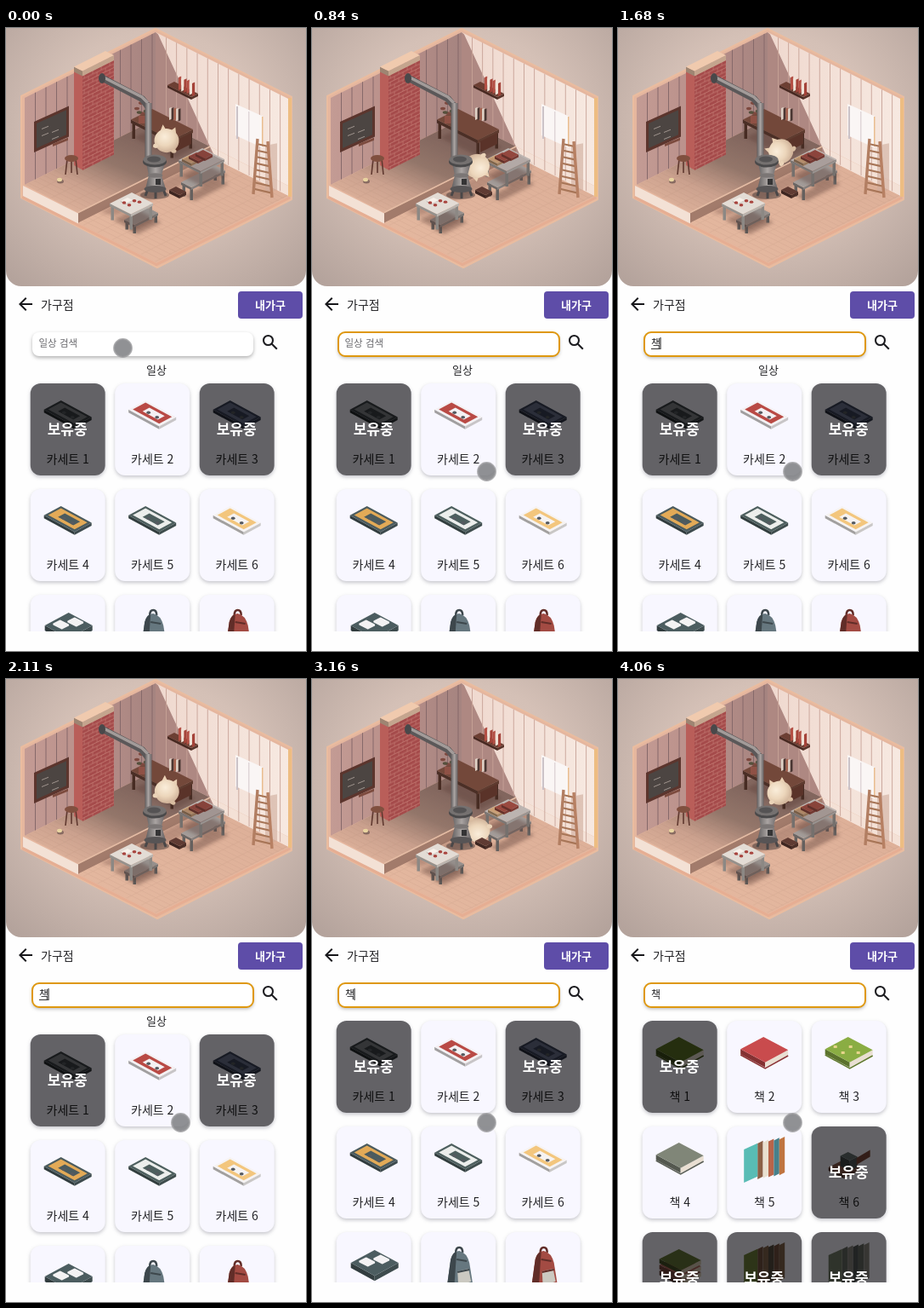
An HTML page that plays this animation: 353 px wide and 731 px high, repeating every 4140 ms.

```html
<!DOCTYPE html>
<html lang="ko">
<head>
<meta charset="utf-8">
<style>
html, body { margin: 0; width: 100%; height: 100%; overflow: hidden; background: #fefefe; }
svg { display: block; }
text { font-family: "Noto Sans CJK KR", "Noto Sans CJK", "Noto Sans CJK JP", sans-serif; fill: #232326; }
.card { fill: #f8f7ff; filter: drop-shadow(0 2px 2px rgba(40,40,60,.26)); }
.soft { filter: blur(2px); }
</style>
</head>
<body>
<svg id="stage" width="353" height="731" viewBox="0 0 353 731"></svg>
<script>
const LOOP = 4140, STEPS = 59, TAU = Math.PI * 2;

const range = n => [...Array(n).keys()];
const each = (n, fn) => range(n).map(fn).join('');
const poly = (pts, fill, extra = '') => `<polygon points="${pts}" fill="${fill}" ${extra}/>`;
const line = (pts, color, w = 1, extra = '') =>
  `<polyline points="${pts}" fill="none" stroke="${color}" stroke-width="${w}" ${extra}/>`;
const rect = (x, y, w, h, fill, extra = '') =>
  `<rect x="${x}" y="${y}" width="${w}" height="${h}" fill="${fill}" ${extra}/>`;
const oval = (x, y, rx, ry, fill, extra = '') =>
  `<ellipse cx="${x}" cy="${y}" rx="${rx}" ry="${ry}" fill="${fill}" ${extra}/>`;
const label = (x, y, size, str, extra = '') =>
  `<text x="${x}" y="${y}" font-size="${size}" ${extra}>${str}</text>`;
const mid = 'text-anchor="middle"';
const soft = a => `class="soft" opacity="${a}"`;
const tone = (hex, f) =>
  `rgb(${[1, 3, 5].map(i => Math.min(255, parseInt(hex.slice(i, i + 2), 16) * f | 0))})`;

// Upright panel whose top edge rises or falls by `slope`
const quad = (x, y, w, h, slope, fill, extra) =>
  poly([x, y, x + w, y + w * slope, x + w, y + w * slope + h, x, y + h], fill, extra);

// Corners of a flat iso tile: back, right, front, left
const tile = (x, y, a, b, k = .5) =>
  [[x, y], [x + a, y + a * k], [x + a - b, y + (a + b) * k], [x - b, y + b * k]];

function box(x, y, a, b, h, color, k = .5, rightColor = tone(color, .82)) {
  const left = tile(x, y, a, b, k)[3], front = tile(x, y, a, b, k)[2];
  return quad(...left, a, h, k, tone(color, .66)) + quad(...front, b, h, -k, rightColor) + poly(tile(x, y, a, b, k), color);
}

function bench(x, y, a, b, leg, color, thick = 3) {
  const feet = tile(x, y + thick, a - 3, b - 3).map(([fx, fy]) => rect(fx - 1.5, fy, 3.5, leg, tone(color, .62))).join('');
  return poly(tile(x + 4, y + leg + 1, a, b), '#5d4039', soft(.42)) + feet + box(x, y, a, b, thick, color);
}

// Room coordinates: u runs down-right, v down-left, z up
const at = (u, v, z = 0) => [176 + u - v, 107 + (u + v) / 2 - z];

const fade = (id, attrs, colors, kind = 'linear') =>
  `<${kind}Gradient id="${id}" ${attrs}>${colors.map((c, i) => `<stop offset="${i / (colors.length - 1)}" stop-color="${c}"/>`).join('')}</${kind}Gradient>`;

const defs = '<defs>' +
  fade('bg', 'cx=".5" cy=".45" r=".72"', ['#e3cec3', '#d4c0b6', '#b3a29b'], 'radial') +
  fade('wall', 'x1="0" x2="1"', ['#c39b94', '#b98f89', '#a58480']) +
  fade('lit', 'x1="0" x2="1"', ['#efd8ce', '#f7e9e1']) +
  fade('deck', 'x1=".15" y1=".95" x2=".7" y2=".3"', ['#deb29b', '#cba18e', '#93766a', '#82665e']) +
  fade('floor', 'x1="0" y1="1" x2="1" y2="0"', ['#e5b9a0', '#dcae97']) +
  fade('pipe', 'x1="0" x2="1"', ['#605d5e', '#aaa4a2', '#676263']) +
  fade('fur', 'cx=".4" cy=".35" r=".75"', ['#faedda', '#ecd6bb', '#c6a68d'], 'radial') + `
<pattern id="brick" width="10" height="9" patternUnits="userSpaceOnUse" patternTransform="translate(90 55) skewY(-26)"><path d="M0 .5H10M0 5H10M2 .5V5M7 5V9" stroke="#c47c74" stroke-width=".7"/></pattern>
<pattern id="plank" width="17" height="6" patternUnits="userSpaceOnUse" patternTransform="matrix(1 .5 -1 .5 0 0)"><path d="M0 .5H17M5 .5V6" stroke="#96685a" stroke-width=".5" fill="none" opacity=".2"/></pattern>
<clipPath id="list"><rect width="353" height="708"/></clipPath>
<clipPath id="hall"><rect y="-25" width="353" height="328" rx="18"/></clipPath>
</defs>`;

function shell() {
  const deck = [at(0, 154), at(0, 0), at(64, 0), at(64, 155)];
  const floor = [at(64, 0, -12), at(156, 0, -12), at(156, 155, -12), at(64, 155, -12)];
  const rim = [at(0, 158, 106), at(0, 0, 106), at(160, 0, 106), at(160, 0, -14), at(160, 158, -15), at(0, 158, -13)];
  const textured = (pts, fill) => poly(pts, fill) + poly(pts, 'url(#plank)');
  return rect(0, -25, 353, 328, 'url(#bg)') +
    poly(rim, '#e5b69e', 'stroke="#eabc9f" stroke-width="2" stroke-linejoin="round"') +
    quad(22, 82, 154, 102, -.5, 'url(#wall)') +
    each(12, i => quad(34 + i * 12.5, 76 - i * 6.25, 1, 102, -.5, '#86696a')) +
    quad(176, 5, 156, 102, .5, 'url(#lit)') + quad(240, 139, 92, 12, .5, '#f4e1d6') +
    poly([at(0, 0, 102), at(3, 0, 101), at(70, 0, -10), at(64, 0, -12), at(64, 0), at(0, 0)], '#ae8882') +
    each(12, i => quad(188 + i * 12.2, 11 + i * 6.1, .9, i > 4 ? 113 : 101, .5, '#c7a297')) +
    textured(deck, 'url(#deck)') +
    quad(85, 217, 155, 12, -.5, '#a27b6b') + line([at(64, 155), at(64, 0)], '#e4bca4', 1.5) +
    quad(20, 185, 65, 12, .5, '#f3e1d5') +
    textured(floor, 'url(#floor)') +
    poly([at(64, 130, -12), at(64, 0, -12), at(84, 0, -12), at(78, 125, -12)], '#8c6559', soft(.45)) +
    line([at(158, 0, 104), at(158, 0, -12)], '#edbd82', 4) +
    line([at(0, 157, -13), at(158, 157, -13), at(158, 0, -13)], '#e6ae93', 3);
}

const chimney = quad(80, 49, 10, 112, .55, '#b95e59') + quad(90, 55, 37, 112, -.5, '#a54b4b') +
  quad(90, 55, 37, 112, -.5, 'url(#brick)') + box(117, 27, 10, 37, 6, '#f0caae');

const board = quad(33, 110, 41, 36, -.45, '#5c352d') + quad(36, 112, 35, 29, -.45, '#4c4542') +
  each(4, i => quad(42 + i % 2 * 12, 118 + i * 4, 8, 1, -.4, '#a0958e')) + quad(55, 136, 18, 3, -.4, '#7c4b3e');

const stool = each(3, i => line([72 + i * 5, 153, 70 + i * 7, 172 - i % 2 * 2], '#5f382f', 1.6)) + oval(77, 153, 8, 4, '#80503f') +
  oval(64, 180, 4, 2.5, '#886b61') + oval(63, 178, 3, 2.2, '#e9d4a0');

// A row of standing volumes
const volumes = (x, y, n, w, h, dy, colors) =>
  each(n, i => quad(x + i * w, y + i * dy, w, h, -.5, colors[i % colors.length]));

const shelf = box(198, 63, 28, 8, 3, '#6c3f33') + volumes(203, 58, 6, 3.2, 15, 1.4, ['#b44f44', '#f0e2d6', '#a54339']);

const pane = quad(270, 89, 32, 37, .45, '#faf6f5') + rect(271, 92, 2, 38, '#cbc2c7') + rect(285, 98, 1.5, 35, '#dfd6d8') + rect(301, 104, 1.5, 35, '#e9bd8f');

const desk = bench(172, 95, 48, 25, 20, '#73483a', 4) + quad(198, 133, 20, 13, -.5, '#5a3329') +
  each(7, i => oval(160 + 6 * Math.sin(i * 2.4), 94 + 6 * Math.cos(i * 2.4), 3, 1.8, i % 2 ? '#55503c' : '#7d493f')) +
  quad(156, 103, 8, 9, 0, '#8f5145') + volumes(192, 94, 5, 2.7, 14, .4, ['#dfd2c6', '#4a3632', '#a4614e']);

const longBench = bench(246, 161, 12, 40, 15, '#a39c99') + bench(231, 141, 26, 28, 18, '#bdb5b1') +
  each(3, i => box(216 + i * 8, 149 - i * 3, 11, 9, 3, i ? '#9a493f' : '#cba177'));

const frontTable = bench(167, 211, 12, 28, 10, '#96908d') + bench(148, 193, 25, 26, 18, '#e3dcd5') +
  box(143, 199, 6, 8, 1, '#f7f0e9') + each(4, i => oval(139 + i * 6, 205 + 3 * Math.sin(i * 2), 2.3, 1.7, '#a8443e'));

const ladder = quad(305, 138, 14, 55, -.2, '#cfac9b', 'opacity=".6"') +
  each(8, i => line([295 - i * .6, 136 + i * 7.5, 309 + i * .5, 139 + i * 7.8], '#a77557', 2.2)) +
  line('296,130 291,195', '#b27e62', 3.4) + line('308,133 313,199', '#b78063', 3.4);

const stove = line('112,58 160,83 168,93', '#5b5859', 8, 'stroke-linejoin="round"') +
  line('113,57 160,81 167,88', '#a29b99', 3.5) + oval(113, 59, 4, 6, '#49484a') + rect(163.5, 88, 8, 65, 'url(#pipe)') +
  oval(175, 196, 17, 5, '#5d4a45', 'opacity=".6"') +
  each(3, i => line([168 + i * 8, 186, 164 + i * 12, 197 + i % 2 * 3], '#4a4748', 3)) +
  `<path d="M165 158H187L183 173L188 189H164L168 173Z" fill="url(#pipe)"/>` +
  oval(175.5, 189, 13, 4, '#575455') + oval(175.5, 173, 9, 2.8, '#7b7675') + oval(175, 157, 14, 6.5, '#4a494a') +
  oval(175, 154.5, 13.5, 6, '#757170') + oval(174, 154, 8, 3.4, '#555354') + rect(176, 177, 6, 7, '#353435');

const crate = box(200, 186, 12, 8, 4, '#5f3b33');
const pet = `<g id="pet"><path d="M-9 -10L-7 -18L-2 -12ZM3 -12L8 -17L10 -9Z" fill="#ead0b3"/>` +
  oval(0, 0, 14.5, 14, 'url(#fur)') + oval(-12, 8, 3, 2.5, '#ead3b8') + oval(10, 11, 3.2, 2.4, '#d9bda1') + '</g>';

function cassette(body, tape) {
  const spot = d => oval(44.5 + d, 37 + d * .54, 2.4, 1.7, '#555a60');
  return box(36, 20, 36, 20, 3.5, body, .54) + poly(tile(36, 22.5, 31, 15, .54), tape) +
    poly(tile(40.5, 28.5, 18, 8, .54), body) + spot(-5) + spot(5);
}

const video = box(45, 21, 28, 28, 6, '#4c5d60', .54) +
  [35, 52].map((x, i) => poly(tile(x, 31 - i * 3, 9, 7, .5), '#f3f2f3', 'stroke="#f3f2f3" stroke-width="3" stroke-linejoin="round"')).join('');

function backpack(color) {
  const dark = tone(color, .6);
  return `<path d="M41 24q0-6 4-6t4 6" fill="none" stroke="${dark}" stroke-width="2.5"/>
<path d="M31 61L35 32Q38 22 45 22Q54 24 57 36L61 61L46 69Z" fill="${color}"/><path d="M31 61L35 32Q37 24 42 23L39 66Z" fill="${dark}"/>
<path d="M43 46L56 43L59 58L44 63Z" fill="#cbc9c1"/><path d="M43 47L57 44M42 32L54 34" stroke="${dark}" stroke-width="2"/>`;
}

const book = color => box(43, 19, 29, 27, 6, color, .53, '#e9dfd2') + line('16,40 45,56 72,41', tone(color, .7), 1.5);
const stickers = each(4, i => rect(26 + i * 9, 29 + i % 2 * 7, 4, 3, '#e6d58b'));
const row = (cover, spines) => volumes(36, 20, 5, 6.4, 42, -1.2, spines) + quad(20, 27, 16, 39, -.45, cover);
const pile = box(38, 39, 18, 18, 4, '#87574a') + box(43, 30, 11, 9, 12, '#667071') + quad(53, 37, 16, 8, -.6, '#7e493b');
const stack = ['#874e43', '#b2675c', '#68793a'].map((c, i) => box(43, 34 - i * 7, 26, 23, 5, c, .5, '#ddceb7')).join('');

const cassettes = [
  cassette('#3b4046', '#82868a'), cassette('#f4f1f3', '#b94a45'), cassette('#3a4058', '#6c7390'),
  cassette('#4b5b5e', '#e3aa57'), cassette('#4d5f5e', '#eceeec'), cassette('#f6f3f2', '#f3c67d'),
  video, backpack('#66777f'), backpack('#a34b43')];
const books = [
  book('#5d7426'), book('#c94b4d'), book('#8aad43') + stickers,
  book('#808678'), row('#59bcb5', ['#8b6046', '#e9e0d0', '#b86449', '#47808b', '#c07440']), pile,
  stack, row('#71823c', ['#765240', '#84684f', '#594d42']), row('#77806c', ['#666b65', '#8a8780', '#545957'])];

function grid(id, icons, name, owned) {
  const cards = icons.map((icon, i) => {
    const x = 28.7 + i % 3 * 99.5, y = 417 + Math.floor(i / 3) * 124;
    const veil = owned.includes(i + 1)
      ? rect(0, 0, 88, 108, '#000', 'rx="12" opacity=".6"') + label(43.5, 60, 17, '보유중', mid + ' font-weight="700" style="fill:#fff"') : '';
    return `<g transform="translate(${x} ${y})">${rect(0, 0, 88, 108, '', 'rx="12" class="card"')}${icon}${label(44, 94, 14, name + ' ' + (i + 1), mid)}${veil}</g>`;
  }).join('');
  return `<g id="${id}">${cards}</g>`;
}

const ui = label(41, 330, 14, '가구점') + rect(273, 309, 76, 32, '#5e4da8', 'rx="4"') +
  label(311, 329.5, 13, '내가구', mid + ' font-weight="700" style="fill:#fff"') +
  `<path transform="translate(11 312)" d="M20 11H7.83l5.59-5.59L12 4l-8 8 8 8 1.41-1.41L7.83 13H20z" fill="#17171b"/>
<g fill="none" stroke="#1d1d21" stroke-width="2.1"><circle cx="308.5" cy="366.5" r="5.5"/><path d="M312.3 370.3L318.8 376.8"/></g>` +
  rect(31, 357, 260, 28, '#fff', 'rx="8" style="filter:drop-shadow(0 2px 2px rgba(0,0,0,.3))"') +
  rect(31, 357, 260, 28, 'none', 'id="ring" rx="8" stroke="#df980f" stroke-width="2"') +
  label(38.5, 374.3, 11.5, '일상 검색', 'id="hint" style="fill:#69696d"') + label(39, 374.5, 12, '', 'id="query"') +
  rect(39, 376, 11, 1, '#333', 'id="under"') + rect(39, 363, 1, 14, '#111', 'id="caret"') +
  label(177, 406, 13, '일상', mid + ' id="title"');

const $ = id => document.getElementById(id);
$('stage').innerHTML = defs +
  `<g clip-path="url(#hall)">${shell() + chimney + board + stool + shelf + pane + desk + longBench}` +
  poly(tile(231, 143, 25, 27), '#49302e', 'id="shade"') + pet + crate + stove + ladder + frontTable + '</g>' + ui +
  `<g clip-path="url(#list)">${grid('before', cassettes, '카세트', [1, 3])}${grid('after', books, '책', [1, 6, 7, 8, 9])}</g>` +
  '<circle id="touch" r="10.4" fill="#7b7c80" fill-opacity=".84" stroke="#9b9b9e" stroke-opacity=".8" stroke-width="2"/>';
$('after').setAttribute('transform', 'translate(0 -16)');

const FOCUS = 140, TYPE = 1120, KEY_GAP = 280, SUBMIT = 3080, RESULT = 3500;
const WORDS = ['', 'ㅊ', '채', '책'];
const show = (id, on) => $(id).setAttribute('visibility', on ? 'visible' : 'hidden');
const move = (id, x, y, more = '') => $(id).setAttribute('transform', `translate(${x} ${y}) ${more}`);

function draw(now) {
  const frame = LOOP / STEPS;
  const t = Math.floor((now % LOOP) / frame + .1) * frame % LOOP;

  // The pet lingers at the top, drops behind the stove and turns once per hop
  const p = t / LOOP * 2 % 1;
  const drop = ((1 - Math.cos(TAU * (p - .06))) / 2) ** 1.8;
  move('pet', 189 + 5 * Math.sin(Math.PI * p), 132 + 46 * drop, `scale(${1 + .08 * drop} 1) rotate(${8 + 360 * p})`);
  $('shade').setAttribute('opacity', .24 * (1 - drop));

  const keys = Math.max(0, Math.min(3, Math.floor((t - TYPE) / KEY_GAP) + 1));
  const lastKey = t >= SUBMIT ? SUBMIT : keys ? TYPE + (keys - 1) * KEY_GAP : FOCUS;
  const width = [0, 8, 10.5, 10.5][keys];
  $('query').textContent = WORDS[keys];
  $('caret').setAttribute('x', 39 + width);
  $('under').setAttribute('width', width);
  show('hint', !keys);
  show('ring', t >= FOCUS);
  show('caret', t >= FOCUS && (t - lastKey) % 1000 < 500);
  show('under', keys && t < SUBMIT);
  show('title', t < SUBMIT);
  show('before', t < RESULT);
  show('after', t >= RESULT);
  move('before', 0, t < SUBMIT ? 0 : -16);

  const m = Math.min(1, Math.max(0, (t - 120) / 230)), ease = m * m * (3 - 2 * m);
  move('touch', 137.5 + 68 * ease, 375.5 + 145 * ease);
}

const start = performance.now();
(function tick() {
  draw(performance.now() - start);
  requestAnimationFrame(tick);
})();
</script>
</body>
</html>
```
